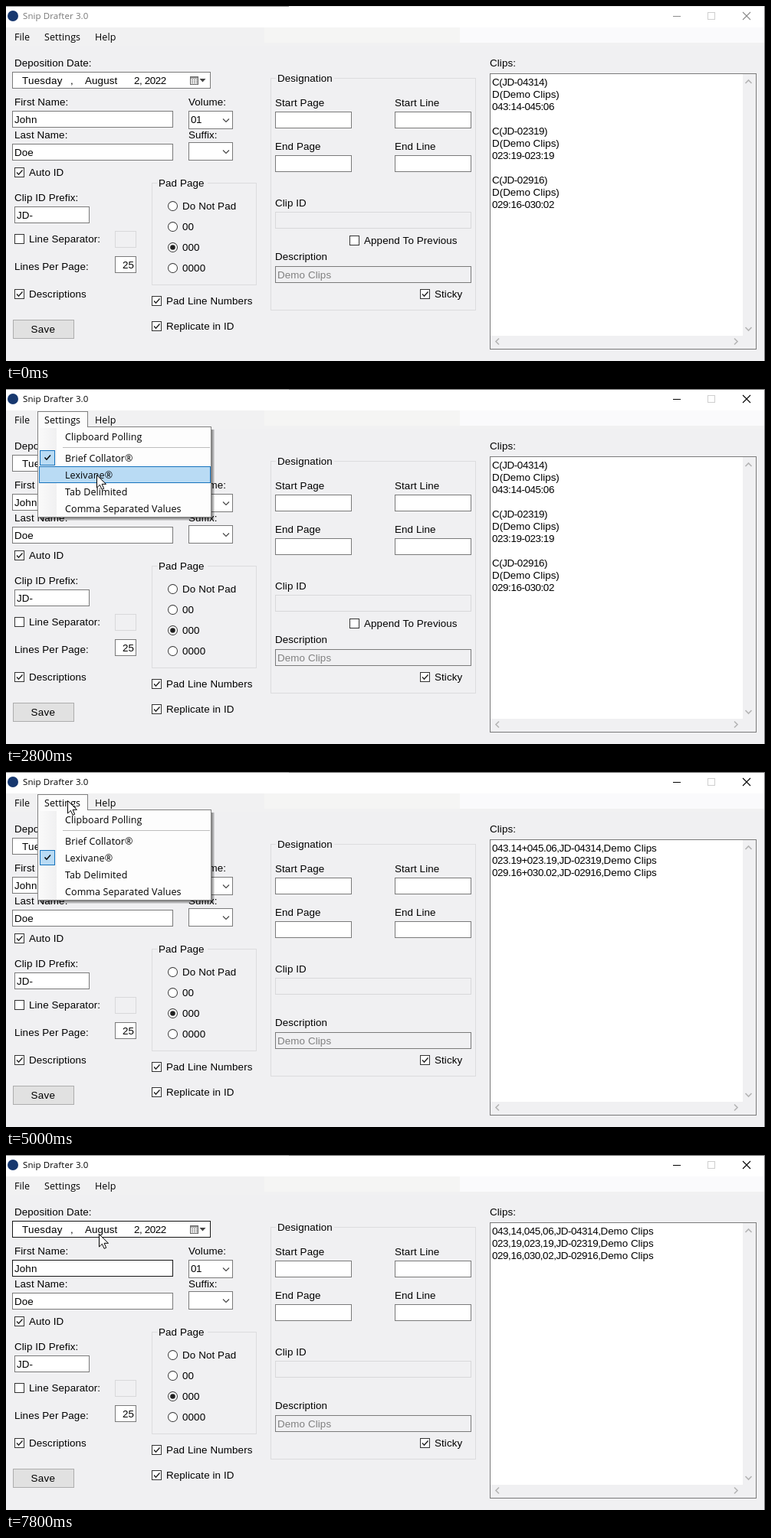
Recreate the animation shown at these times as an HTML page with a canvas. Size 990 px wide and 464 px high, loop 8000 ms.

```html
<!DOCTYPE html>
<html lang="en">
<head>
<meta charset="utf-8">
<title>Settings menu</title>
<style>
  html, body { margin: 0; width: 100%; height: 100%; overflow: hidden; background: #f0f0f2; }
  canvas { display: block; }
</style>
</head>
<body>
<canvas id="stage" width="990" height="464"></canvas>
<script>
const ctx = document.getElementById('stage').getContext('2d');

const LOOP = 8000, STEP = 200;
const FACE = '#f0f0f2', EDGE = '#7a7a7a', FAINT = '#d8d8da', HOT = '#171717';
const BLUE = '#b9dbf4', BLUE_EDGE = '#1673bd';
const LABEL = '13.4px "Liberation Sans", Arial, sans-serif';
const MENU = '12.5px "Open Sans", "Noto Sans", sans-serif';
const TITLE = '11.5px "Open Sans", "Noto Sans", sans-serif';

const ITEMS = [
  ['Clipboard Polling', 62], ['Brief Collator®', 90], ['Lexivane®', 112],
  ['Tab Delimited', 134], ['Comma Separated Values', 156]
];

// Pointer path: time, x, y of the tip
const PATH = [
  [400, 250, 420], [1200, 81, 34], [2000, 81, 34], [2800, 118, 112], [3600, 118, 112],
  [4200, 100, 70], [4600, 80, 37], [5200, 80, 37], [5600, 115, 123], [6400, 140, 155],
  [7000, 140, 155], [7800, 121, 103]
];

function pointerAt(t) {
  if (t < PATH[0][0]) return null;
  const i = PATH.findIndex(p => p[0] > t);
  if (i < 0) return PATH[PATH.length - 1].slice(1);
  const [t0, x0, y0] = PATH[i - 1], [t1, x1, y1] = PATH[i];
  const k = (t - t0) / (t1 - t0);
  return [Math.round(x0 + (x1 - x0) * k), Math.round(y0 + (y1 - y0) * k)];
}

function fill(x, y, w, h, color) {
  ctx.fillStyle = color;
  ctx.fillRect(x, y, w, h);
}

function box(x, y, w, h, inside = '#fff', edge = EDGE) {
  fill(x, y, w, h, edge);
  fill(x + 1, y + 1, w - 2, h - 2, inside);
}

function text(s, x, y, font = LABEL, color = '#000', spacing = 0.1) {
  ctx.font = font;
  ctx.fillStyle = color;
  ctx.letterSpacing = spacing + 'px';
  ctx.fillText(s, x, y);
  return x + ctx.measureText(s).width;
}

// Each point is x, y in turn
function line(points, color, width = 1) {
  ctx.beginPath();
  for (let i = 0; i < points.length; i += 2) ctx.lineTo(points[i], points[i + 1]);
  ctx.strokeStyle = color;
  ctx.lineWidth = width;
  ctx.stroke();
}

function disc(x, y, r, color) {
  ctx.beginPath();
  ctx.arc(x, y, r, 0, Math.PI * 2);
  ctx.fillStyle = color;
  ctx.fill();
}

function tick(x, y, color = '#222') {
  line([x - 3.5, y, x - 1, y + 2.7, x + 4, y - 3], color, 1.4);
}

function chevron(x, y, dx, dy, color, size = 4, width = 1.3) {
  const px = dy * size, py = dx * size;
  const ax = dx * size / 2, ay = dy * size / 2;
  line([x - px - ax, y - py - ay, x + ax, y + ay, x + px - ax, y + py - ay], color, width);
}

function check(x, y, label, on = true) {
  box(x, y, 13, 13, '#fff', '#333');
  if (on) tick(x + 6.5, y + 6.5);
  text(label, x + 19, y + 11);
}

function radio(y, label, on) {
  disc(217.5, y + 0.5, 6.5, '#333');
  disc(217.5, y + 0.5, 5.5, '#fff');
  if (on) disc(217.5, y + 0.5, 3.3, '#222');
  text(label, 230, y + 5);
}

function group(x, y, w, h, label, gap) {
  box(x, y, w, h, FACE, '#dcdcde');
  fill(x + 7, y, gap, 1, FACE);
  text(label, x + 9, y + 5);
}

function combo(y, value) {
  box(238, y, 58, 24);
  text(value, 241, y + 16, LABEL, '#000', -0.4);
  chevron(287, y + 12.5, 0, 1, '#444', 4, 1.1);
}

function titleBar(active) {
  const ink = active ? '#000' : '#8c8c8c';
  fill(0, 0, 990, 28, '#fff');
  fill(0, 0, 369, 1, '#8a8a8a');
  fill(369, 0, 621, 1, active ? '#6a6a6a' : '#e2e2e2');
  disc(9, 13, 7, '#17386f');
  text('Snip Drafter 3.0', 22, 17, TITLE, active ? '#000' : '#777');
  line([870, 13.5, 880, 13.5], ink);
  ctx.strokeStyle = '#cfcfcf';
  ctx.strokeRect(915.5, 8.5, 9, 9);
  line([961, 8, 971, 18], ink, 1.1);
  line([971, 8, 961, 18], ink, 1.1);
}

function menuBar() {
  fill(0, 28, 990, 24, '#f1f1f2');
  fill(337, 28, 255, 20, '#f5f5f4');
  fill(592, 28, 398, 20, '#fafafc');
}

function menuNames() {
  text('File', 11, 45, MENU);
  text('Settings', 50, 45, MENU);
  text('Help', 116, 45, MENU);
}

function leftPanel(dateEdge, nameEdge) {
  text('Deposition Date:', 11, 79);
  box(8, 86, 259, 22, '#fff', dateEdge);
  text('Tuesday', 21, 102, LABEL, '#000', 0.25);
  text(',', 84, 102);
  text('August', 103, 102);
  text('2, 2022', 167, 102, LABEL, '#000', -0.4);
  box(240, 92, 11, 11, '#f4f4f4', '#666');
  fill(241, 93, 9, 2, '#999');
  for (let i = 0; i < 9; i++) fill(242 + i % 3 * 3, 96 + (i / 3 | 0) * 2, 2, 1, '#888');
  ctx.beginPath();
  ctx.moveTo(252.5, 95); ctx.lineTo(260.5, 95); ctx.lineTo(256.5, 99.5);
  ctx.fillStyle = '#444';
  ctx.fill();

  text('First Name:', 11, 130);
  box(8, 137, 210, 22, '#fff', nameEdge);
  text('John', 11, 153);
  text('Volume:', 238, 130);
  combo(137, '01');
  text('Last Name:', 11, 173);
  box(8, 180, 210, 22);
  text('Doe', 11, 196);
  text('Suffix:', 238, 173);
  combo(178, '');

  check(11, 211, 'Auto ID');
  text('Clip ID Prefix:', 11, 255);
  box(11, 262, 98, 22);
  text('JD-', 14, 278);
  check(11, 298, 'Line Separator:', false);
  box(142, 294, 28, 22, FACE, FAINT);
  text('Lines Per Page:', 11, 345);
  box(142, 327, 28, 22);
  text('25', 152, 343);
  check(11, 370, 'Descriptions');
  box(9, 410, 80, 25, '#e1e1e1', '#adadad');
  text('Save', 32.5, 427, LABEL, '#000', 0.3);
}

function padPanel() {
  group(190, 231, 137, 134, 'Pad Page', 66);
  ['Do Not Pad', '00', '000', '0000'].forEach((s, i) => radio(261 + i * 27, s, i === 2));
  check(190, 379, 'Pad Line Numbers');
  check(190, 412, 'Replicate in ID');
}

function designation(mode) {
  group(345, 94, 268, 304, 'Designation', 76);
  ['Start', 'End'].forEach((s, i) => {
    const y = 131 + i * 57;
    text(s + ' Page', 351, y);
    text(s + ' Line', 507, y);
    box(351, y + 7, 100, 22);
    box(507, y + 7, 100, 22);
  });
  text('Clip ID', 351, 262);
  box(351, 269, 256, 22, FACE, FAINT);
  if (mode === 0) check(448, 300, 'Append To Previous', false);
  text('Description', 351, 332);
  box(351, 340, 256, 22, FACE);
  text('Demo Clips', 354, 356, LABEL, '#808080');
  check(540, 370, 'Sticky');
}

function clipList(mode) {
  text('Clips:', 631, 79);
  box(631, 88, 348, 361);
  fill(961, 89, 17, 359, FACE);
  fill(632, 431, 346, 17, FACE);
  const arrow = '#b4b4b4';
  chevron(968.5, 99, 0, -1, arrow, 4, 1.6);
  chevron(968.5, 422, 0, 1, arrow, 4, 1.6);
  chevron(641, 438.5, -1, 0, arrow, 4, 1.6);
  chevron(952, 438.5, 1, 0, arrow, 4, 1.6);

  const code = (s, y) => text(s, 634, y, LABEL, '#000', -0.42);
  const words = (s, x, y) => text(s, x, y, LABEL, '#000', 0);
  const clips = [['043', '14', '045', '06'], ['023', '19', '023', '19'], ['029', '16', '030', '02']];
  clips.forEach(([p, l, q, m], i) => {
    const id = 'JD-' + p + l;
    if (mode === 0) {
      const y = 104 + i * 64;
      code(`C(${id})`, y);
      words('D(Demo Clips)', 634, y + 16);
      code(`${p}:${l}-${q}:${m}`, y + 32);
    } else {
      const y = 104 + i * 16;
      const range = mode === 1 ? `${p}.${l}+${q}.${m}` : [p, l, q, m].join(',');
      words('Demo Clips', code(`${range},${id},`, y), y);
    }
  });
}

function dropdown(mode, pointer) {
  for (let i = 4; i > 0; i--) fill(41 + i, 53, 227, 115 + i, 'rgba(0,0,0,0.13)');
  box(41, 49, 227, 119, '#fdfdfd', '#808080');
  box(41, 29, 66, 21, '#fcfcfc', '#808080');
  fill(42, 49, 64, 2, '#fcfcfc');
  const margin = ctx.createLinearGradient(43, 0, 66, 0);
  margin.addColorStop(0, '#fafafa');
  margin.addColorStop(1, '#f0f0f1');
  fill(43, 51, 23, 116, margin);
  fill(74, 76, 192, 1, '#bdbdbd');

  const hot = ITEMS.find(([, y]) => Math.abs(pointer[1] - y) <= 11);
  if (hot) box(43, hot[1] - 11, 224, 22, BLUE, BLUE_EDGE);
  const mark = ITEMS[mode + 1][1];
  box(44, mark - 10, 20, 20, BLUE, BLUE_EDGE);
  tick(54, mark - 0.5, '#000');
  for (const [name, y] of ITEMS) text(name, 77, y + 5, MENU);
}

function arrowPointer(x, y) {
  const shape = [0, 0, 0, 16.5, 3.9, 12.8, 6.6, 18.8, 9.2, 17.7, 6.6, 11.8, 12, 11.8];
  ctx.beginPath();
  for (let i = 0; i < shape.length; i += 2) ctx.lineTo(x + 0.5 + shape[i], y + 0.5 + shape[i + 1]);
  ctx.closePath();
  ctx.fillStyle = '#fff';
  ctx.fill();
  ctx.strokeStyle = '#000';
  ctx.lineWidth = 1;
  ctx.stroke();
}

function draw(t) {
  const pointer = pointerAt(t);
  const mode = t < 3000 ? 0 : t < 7000 ? 1 : 2;
  const open = (t >= 1400 && t < 3000) || (t >= 4800 && t < 7000);
  const over = (x, y, w, h) => pointer && !open &&
    pointer[0] >= x && pointer[0] < x + w && pointer[1] >= y && pointer[1] < y + h;

  fill(0, 0, 990, 464, FACE);
  titleBar(t >= 1200);
  menuBar();
  leftPanel(over(8, 86, 259, 22) ? HOT : EDGE,
            t >= 7000 || over(8, 137, 210, 22) ? HOT : EDGE);
  padPanel();
  designation(mode);
  clipList(mode);
  if (open) dropdown(mode, pointer);
  else if (over(41, 30, 66, 21)) box(41, 30, 66, 21, BLUE, BLUE_EDGE);
  menuNames();
  fill(989, 0, 1, 464, '#77777a');
  if (pointer) arrowPointer(...pointer);
}

function frame(now) {
  const t = now % LOOP;
  draw(Math.floor(t / STEP) * STEP);
  requestAnimationFrame(frame);
}
requestAnimationFrame(frame);
</script>
</body>
</html>
```
